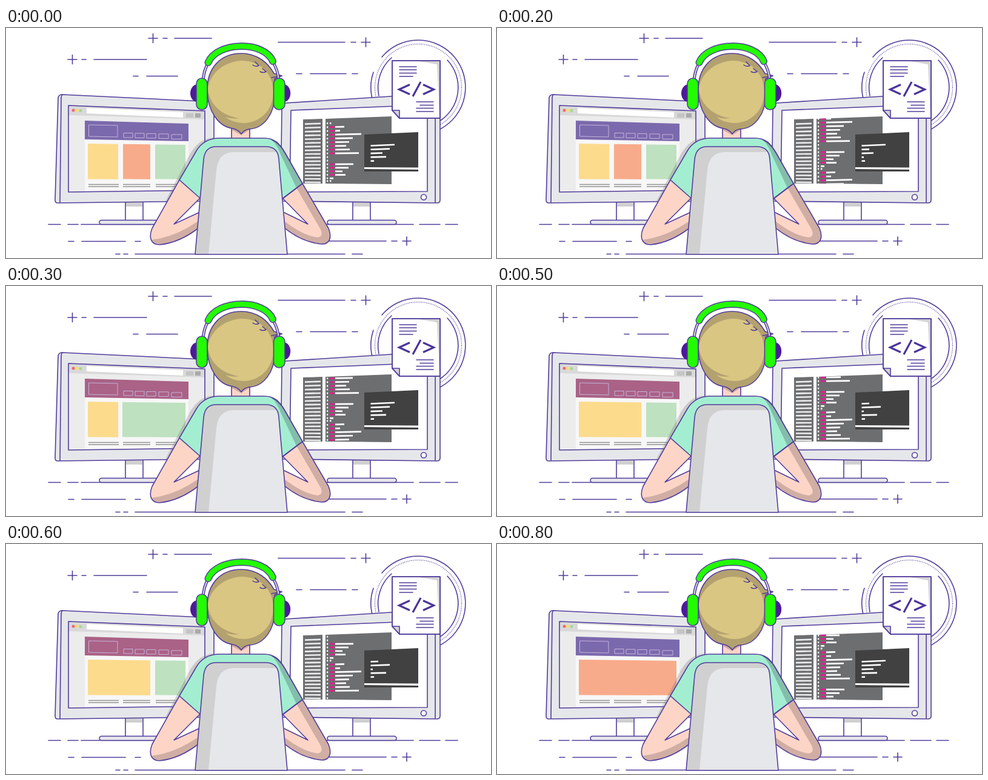
An HTML page that plays this animation: 800x380 px, repeating every 900 ms.

```html
<!DOCTYPE html>
<html lang="en">
<head>
<meta charset="utf-8">
<title>Developer at work</title>
<style>
  html, body { margin: 0; width: 100%; height: 100%; overflow: hidden; background: #fff; }
  svg { display: block; width: 800px; height: 380px; }
  .ink { stroke: #523d9b; stroke-width: 1.6; stroke-linejoin: round; stroke-linecap: round; }
  .bare { fill: none; }
  .metal { fill: #e6e7ea; }
  .shade { fill: #d0d0d1; }
  .skin { fill: #fcd5c7; }
  .skin-shade { fill: #d0aea4; }
  .shirt { fill: #a3eed1; }
  .green { fill: #23fb00; }
</style>
</head>
<body>
<svg viewBox="0 0 800 380">
  <defs>
    <clipPath id="editorClip"><path d="M527 150L636 146V258L527 257Z"/></clipPath>
  </defs>

  <!-- background strokes -->
  <path class="ink bare" d="M102 52h15M109.500 44.500v15M125 52h7M145 52h87
    M235 17h15M242.500 9.500v15M259 17h7M278 17h61M210 79.500h8M232 79.500h51
    M449 23.500h110M569 23.500h8M586 23.500h15M593.500 16v15M479 75.500h9M502 75.500h59M571 75.500h9
    M70 324.500h20M102 324.500h17M124 324.500h184M470 324.500h202M682 324.500h34M725 324.500h20
    M103 352.500h9M125 352.500h72M213 352.500h9M533 352h94M636 352h9M654 352h14M661 345v14
    M181 373.500h7M194 373.500h7M213 373.500h346M571 373.500h17"/>

  <!-- left monitor -->
  <path class="ink" fill="#fff" d="M197 287h29v31h-29z"/>
  <path class="shade" d="M198 288h27v7h-27z"/>
  <rect class="ink metal" x="154" y="317.500" width="100" height="7" rx="3.500"/>
  <path class="ink metal" d="M93 110L343 122V286L85 289Q81 289 81 284L86 115Q87 110 93 110Z"/>
  <path class="ink bare" d="M93 110Q91 112 91 117L89 288"/>
  <path fill="#ececed" d="M103 128L328 137V268L103 271Z"/>
  <path fill="#d9d9da" d="M103 128L328 137V151L103 144Z"/>
  <path fill="#fff" d="M133 132L292 139V148L133 141Z"/>
  <path fill="#c4c4c5" d="M297 141h12v7h-12z"/>
  <path fill="#aaa" d="M312 141h9v7h-9z"/>
  <circle cx="111" cy="136" r="2.500" fill="#ee6a72"/>
  <circle cx="117" cy="136" r="2.500" fill="#f9df62"/>
  <circle cx="123" cy="136.500" r="2.500" fill="#a9d59b"/>
  <path fill="#f7f7f7" d="M130 153L301 158V268L130 270Z"/>
  <path id="banner" d="M130 153L301 158V187L130 184Z"/>
  <path fill="none" stroke="#c5b4dc" d="M136.500 160L184 161V180L136.500 179Z
    M194 173.500h15v7.500h-15zM213 174h15v7.500h-15zM232 174.500h15v7.500h-15zM252 175h16v7.500h-16zM273 176h17v7.500h-17z"/>
  <g id="cards"></g>
  <path fill="none" stroke="#929292" stroke-width="1.500" d="M136 258.500h50M193 258.500h45M247 258.500h49M136 262h50M193 262h45M247 262h49"/>
  <path class="ink bare" d="M103 128L328 137V268L103 271Z"/>

  <!-- badge rings, partly hidden by the monitor -->
  <g class="ink bare">
    <path d="M620 48A78 78 0 1 1 606 123A78 78 0 0 1 606 73"/>
    <circle cx="680" cy="98" r="71.500" stroke-width="1.200" stroke-dasharray="0.300 2.500"/>
    <path d="M615 112A66 66 0 0 1 636 49M728 53A66 66 0 0 1 715 154"/>
  </g>

  <!-- right monitor -->
  <path class="ink" fill="#fff" d="M572 287h29v31h-29z"/>
  <path class="shade" d="M573 288h27v7h-27z"/>
  <rect class="ink metal" x="530" y="317.500" width="114" height="7" rx="3.500"/>
  <path class="ink metal" d="M460 124L705 108.500Q715 110 716 120V284Q716 289 711 289L453 286L455 130Q455 124 460 124Z"/>
  <path class="ink bare" d="M708 120V288"/>
  <path class="ink" fill="#fff" d="M470 136L695 127V270L468 271Z"/>
  <circle class="ink" cx="689" cy="279.500" r="4.500" fill="#fff"/>
  <path fill="#6d6e70" d="M490 151L522 150V257H490ZM527 150L636 146V258L527 257Z"/>
  <path id="outline" fill="none" stroke="#ececec" stroke-width="2.600"/>
  <g clip-path="url(#editorClip)" fill="none" stroke-width="2.700">
    <path id="code" stroke="#fff"/>
    <path id="keywords" stroke="#e31c8d"/>
  </g>
  <path fill="#414142" d="M591 176L680 172V237H591Z"/>
  <path fill="#f5f5f5" d="M591 230L680 230.500V234L591 233Z"/>
  <path id="terminal" fill="none" stroke="#fff" stroke-width="2.600"/>

  <!-- document badge -->
  <path class="ink" fill="#fff" d="M637 54H716V149H649L637 136Z"/>
  <path fill="#d3d3d6" d="M681 55H715V148L711 60Z"/>
  <path class="ink" fill="#d3d3d6" d="M637 136H649V149Z"/>
  <path class="ink bare" d="M637 54H716V149H649L637 136ZM649 64h28M649 69h28M649 74.500h28M649 80h22M677 122h28M683 127.500h22M677 132.500h28M677 138h28"/>
  <path fill="none" stroke="#4b349b" stroke-width="3.200" d="M666 93.500L648.500 101.500L666 109.500M684 89L671 113M688 93.500L705.500 101.500L688 109.500"/>

  <!-- person -->
  <path fill="#777" opacity=".3" d="M343 181C322 183 313 193 303 209L262 288H300L345 200ZM447 186L506 288H485L450 220Z"/>
  <path class="skin" d="M286 251L241 331C235 346 239 358 253 358Q286 355 318 330V305L277 324L320 281Z"/>
  <path class="skin-shade" d="M240 350Q278 346 317 319V330Q286 354 253 357Q243 357 240 350Z"/>
  <path class="ink bare" d="M286 251L241 331C235 346 239 358 253 358Q286 355 318 330M318 305L277 324L320 281"/>
  <path class="skin" d="M489 257L532 331C538 346 534 357 521 357Q488 354 459 330V305L498 324L456 281Z"/>
  <path class="skin-shade" d="M489 257L532 331C538 346 534 357 521 357Q488 354 459 330V319Q490 343 514 346Q524 345 519 333L479 264Z"/>
  <path class="ink bare" d="M489 257L532 331C538 346 534 357 521 357Q488 354 459 330M459 305L498 324L456 281"/>
  <path class="ink skin" d="M372 160H402V188H372Z"/>
  <path class="skin-shade" d="M373 162H401V169L388 177L373 169Z"/>
  <path class="ink shirt" d="M350 182H426C442 182 451 190 460 206L489 257L456 282L430 230H345L320 281L286 251L314 203Q326 183 350 182Z"/>
  <path fill="#84beaa" d="M439 185Q451 190 460 206L489 257L479 264L454 211Q448 195 439 185Z"/>
  <path class="ink bare" d="M439 185Q451 190 460 206L489 257L456 282"/>
  <path class="shade" d="M312 374L326 217Q328 196 347 196H430Q449 197 450 217L464 374Z"/>
  <path class="metal" d="M334 374L347 235Q350 205 376 205H447Q450 211 450 217L464 374Z"/>
  <path class="ink bare" d="M312 374L326 217Q328 196 347 196H430Q449 197 450 217L464 374Z"/>

  <path class="ink" fill="#b3a170" d="M332 104C331 65 355 42 388 42C414 42 432 57 442 75L455 79L443 84V112C443 142 425 166 401 167Q393 168 388 175Q383 168 374 166C350 163 333 137 332 104Z"/>
  <path fill="#d9c682" d="M333 100C337 72 363 55 389 54C420 54 441 76 441 106C441 136 418 158 390 157Q373 156 362 147Q374 151 384 149C354 144 335 125 333 100Z"/>
  <path class="ink bare" d="M407 61Q412 65 417 62M411 56L417 62M419 72Q424 75 429 72M423 67L429 72M438 82L455 79"/>

  <path fill="none" stroke="#523d9b" stroke-width="5" d="M334 57Q326 70 325 88M440 56Q449 70 450 88"/>
  <path fill="none" stroke="#d8d8e0" stroke-width="2" d="M334 57Q326 70 325 88M440 56Q449 70 450 88"/>
  <path fill="none" stroke="#523d9b" stroke-width="12" stroke-linecap="round" d="M333.500 57C348 22 426 21 440 55"/>
  <path fill="none" stroke="#23fb00" stroke-width="9" stroke-linecap="round" d="M333.500 57C348 22 426 21 440 55"/>
  <path fill="#4b1b96" d="M316 93C300 94 300 122 316 122ZM458 93C473 94 473 122 458 122Z"/>
  <rect class="ink green" x="314" y="83" width="18" height="52" rx="9"/>
  <rect class="ink green" x="441.500" y="83" width="18.500" height="52" rx="9"/>
</svg>

<script>
const byId = id => document.getElementById(id);
const STEP = 100, STEPS = 9;
const SCROLL = 10, LIST_HEIGHT = 95.4;

// Right end of each code line; 0 is an empty line, under 541 has no keyword.
const lineEnds = [536.5, 558, 551, 586, 572, 566, 561, 567, 582, 0, 0, 573, 565, 555, 560, 540];

const YELLOW = '#fddb8d', ORANGE = '#f8ab8b', GREEN = '#bee1c0';
const PURPLE = '#7b69ad', PLUM = '#aa6286';
const layouts = [
  { until: 3, banner: PURPLE, cards: [[135, 185, YELLOW], [193, 238, ORANGE], [246, 296, GREEN]] },
  { until: 5, banner: PLUM, cards: [[135, 185, YELLOW], [192, 296, GREEN]] },
  { until: 7, banner: PLUM, cards: [[135, 238, YELLOW], [246, 296, GREEN]] },
  { until: 9, banner: PURPLE, cards: [[135, 296, ORANGE]] }
];

const longLog = [641, 633, 621, 627, 607];
const mixedLog = [641, 614, 621, 605, 607];
const shortLog = [614, 633, 605, 627, 607];
const logAt = step => step === 1 || step === 2 ? mixedLog : step >= 5 && step <= 7 ? shortLog : longLog;

// Perspective: rows get closer and less slanted down the list.
const rowY = row => 157.6 + 6.4 * row - 0.024 * row * row;
const rowSlope = row => (-3.5 + 4.5 * row / lineEnds.length) / 109;

function drawCode(step) {
  let code = '', keywords = '';
  for (const copy of [0, 1]) {
    lineEnds.forEach((end, row) => {
      const y = rowY(row) + copy * LIST_HEIGHT - step * SCROLL;
      const at = x => `${x} ${(y + (x - 527) * rowSlope(row)).toFixed(2)}`;
      const line = (x1, x2) => `M${at(x1)}L${at(x2)}`;
      const hasKeyword = end > 541;
      code += line(529, 531.2);
      if (end) code += line(hasKeyword ? 543 : 534, end);
      if (hasKeyword) keywords += line(533.5, 542);
    });
  }
  byId('code').setAttribute('d', code);
  byId('keywords').setAttribute('d', keywords);
}

function drawPage(step) {
  const { banner, cards } = layouts.find(layout => step < layout.until);
  const top = x => 191 + (x - 135) / 80;
  byId('banner').setAttribute('fill', banner);
  byId('cards').innerHTML = cards.map(([left, right, fill]) =>
    `<path fill="${fill}" d="M${left} ${top(left)}L${right} ${top(right)}V250L${left} 249.500Z"/>`).join('');
}

function drawTerminal(step) {
  byId('terminal').setAttribute('d', logAt(step).map((end, i) => {
    const y = 194.5 + i * 6.3;
    return `M601.500 ${y}L${end} ${y - (end - 602) * (0.045 - i * 0.008)}`;
  }).join(''));
}

byId('outline').setAttribute('d', Array.from({ length: 17 }, (_, row) =>
  `M493 ${rowY(row) + 1}L519 ${rowY(row) + 1 + 26 * rowSlope(row)}`).join(''));

let shown = -1;
function tick(now) {
  const step = Math.floor(now / STEP) % STEPS;
  if (step !== shown) {
    shown = step;
    drawPage(step);
    drawCode(step);
    drawTerminal(step);
  }
  requestAnimationFrame(tick);
}
tick(0);
</script>
</body>
</html>
```
